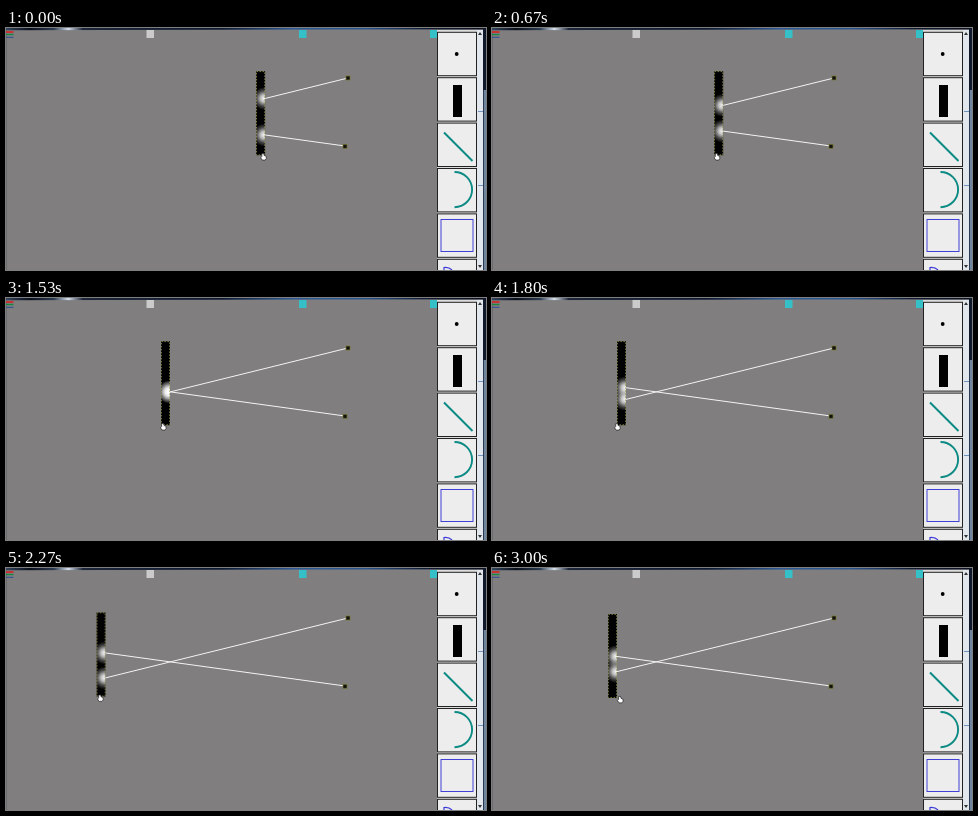
Write an HTML page that moves like this. It is 480x242 px and loops after 3070 ms.

```html
<!DOCTYPE html>
<html>
<head>
<meta charset="utf-8">
<style>
html, body { margin: 0; width: 100%; height: 100%; overflow: hidden; background: #807e7f; }
svg { display: block; width: 480px; height: 242px; }
</style>
</head>
<body>
<svg viewBox="0 0 480 242" fill="none">
  <defs>
    <radialGradient id="glow">
      <stop offset="0" stop-color="#fff" stop-opacity=".96"/>
      <stop offset=".3" stop-color="#fff" stop-opacity=".75"/>
      <stop offset=".65" stop-color="#fff" stop-opacity=".3"/>
      <stop offset="1" stop-color="#fff" stop-opacity="0"/>
    </radialGradient>
    <linearGradient id="strip">
      <stop offset="0" stop-color="#34465e"/>
      <stop offset=".05" stop-color="#0a0f1c"/>
      <stop offset=".1" stop-color="#2c3c52"/>
      <stop offset=".13" stop-color="#d5e0ec"/>
      <stop offset=".16" stop-color="#1c2638"/>
      <stop offset=".45" stop-color="#0c1830"/>
      <stop offset=".6" stop-color="#2d5a94"/>
      <stop offset=".75" stop-color="#28528a"/>
      <stop offset=".87" stop-color="#0e1a33"/>
      <stop offset="1" stop-color="#0a1020"/>
    </linearGradient>
    <clipPath id="barClip"><rect width="9" height="84"/></clipPath>
  </defs>

  <rect width="480" height="242" fill="#807e7f"/>
  <path d="M0 0H480V1.2L300 1.4L0 2.2Z" fill="url(#strip)"/>
  <path d="M.5 2V242" stroke="#6b6b70"/>
  <path d="M0 4H7.5" stroke="#e01818" stroke-width="1.5"/>
  <path d="M0 6.5H7.5" stroke="#14883c" stroke-width="1.3"/>
  <path d="M0 9.3H7.5" stroke="#2a4a98"/>
  <rect x="140.5" y="2" width="7.5" height="8" fill="#cbcbcb"/>
  <rect x="293" y="2" width="7.5" height="8" fill="#34c0c6"/>
  <rect x="424" y="2" width="7" height="8" fill="#34c0c6"/>

  <rect x="431" y="2" width="40" height="240" fill="#dcdcdc"/>
  <g id="cells" fill="#eeeded" stroke="#222"></g>
  <circle cx="450.7" cy="26" r="1.9" fill="#000"/>
  <rect x="447" y="57" width="9" height="32" fill="#000"/>
  <g stroke="#0c8a84" stroke-width="1.9">
    <path d="M438 104.5L466.5 133"/>
    <path d="M448.5 144A17.6 17.6 0 0 1 448.5 179.2"/>
  </g>
  <rect x="435" y="191.5" width="32" height="32" stroke="#4040d4"/>
  <path d="M438 242V239.5Q443 239 446 242" stroke="#3a3ad8" stroke-width="1.2"/>

  <rect x="471" y="2" width="6" height="240" fill="#e2e7ed"/>
  <path d="M472 7L474 4L476 7ZM472 237L474 240L476 237Z" fill="#333"/>
  <path d="M472 83.5H477M472 157.5H477" stroke="#6f93bd"/>
  <rect x="477" y="0" width="3" height="62" fill="#10182b"/>
  <rect x="477" y="62" width="3" height="180" fill="#6f86a0"/>
  <path d="M477.5 62V242" stroke="#2b3a50"/>

  <g id="bar">
    <rect width="9" height="84" fill="#000"/>
    <g clip-path="url(#barClip)">
      <circle class="spot" cx="8" r="11.5" fill="url(#glow)"/>
      <circle class="spot" cx="8" r="11.5" fill="url(#glow)"/>
    </g>
    <rect x=".4" y=".4" width="8.2" height="83.2" stroke="#9a9a50" stroke-width=".8" stroke-dasharray="1.5 1.5"/>
  </g>
  <g stroke="#f4f4f4">
    <path class="ray"/>
    <path class="ray"/>
  </g>
  <g fill="#111" stroke="#77772e" stroke-width=".7">
    <rect x="340" y="48" width="4" height="4"/>
    <rect x="337" y="116.3" width="4" height="4"/>
  </g>
  <path id="hand" d="M-1.7 -3.2L.3 -3.2L.7 -1.3L2.7 -.5L2.8 1.7L1.7 3.3L-1.2 3.3L-2.8 1L-1.7 -.3Z"
        fill="#fff" stroke="#222" stroke-width=".7"/>
</svg>
<script>
const LOOP = 3070, BAR_WIDTH = 9;
const $ = s => document.querySelector(s);
const all = s => [...document.querySelectorAll(s)];
const bar = $('#bar'), hand = $('#hand');
const spots = all('.spot'), rays = all('.ray');
const sources = [
  { x: 342, y: 50, slope: -0.247 },
  { x: 339, y: 118, slope: 0.138 }
];

// Key points are [step, value], at 15 steps per second.
const barX = [[0, 250.1], [5, 250.1], [10, 222.2], [13, 200.6], [17, 178.2], [21, 162.6],
  [23, 155], [29, 110], [30, 106.1], [35, 86.7], [37, 85.2], [39, 88.2], [45, 116]];
const barY = [[0, 43.2], [30, 43.2], [35, 44.8], [39, 45], [45, 46]];
const handDx = [[0, 7.4], [5, 7.4], [10, 2.8], [17, 5.8], [23, 2.3], [30, -1], [35, 5],
  [37, 7], [39, 9.3], [45, 12.3]];

function at(keys, n) {
  const i = keys.findIndex(k => k[0] >= n);
  if (i === 0) return keys[0][1];
  const [a, va] = keys[i - 1], [b, vb] = keys[i];
  return va + (vb - va) * (n - a) / (b - a);
}

for (let i = 0; i < 6; i++) {
  const cell = document.createElementNS('http://www.w3.org/2000/svg', 'rect');
  Object.entries({ x: 431.5, y: 4.3 + i * 45.4, width: 39, height: 43.4 })
    .forEach(([name, value]) => cell.setAttribute(name, value));
  $('#cells').append(cell);
}

function draw(time) {
  const step = Math.min(45, Math.floor((time % LOOP) * 0.015 + 0.06));
  const x = at(barX, step), y = at(barY, step), edge = x + BAR_WIDTH;
  bar.setAttribute('transform', `translate(${x} ${y})`);
  sources.forEach((s, i) => {
    const hit = s.y + s.slope * (edge - s.x);
    spots[i].setAttribute('cy', hit - y);
    rays[i].setAttribute('d', `M${s.x} ${s.y}L${edge} ${hit}`);
  });
  hand.setAttribute('transform', `translate(${x + at(handDx, step)} ${y + 85.6})`);
}

const start = performance.now();
function tick() {
  draw(performance.now() - start);
  requestAnimationFrame(tick);
}
tick();
</script>
</body>
</html>
```
